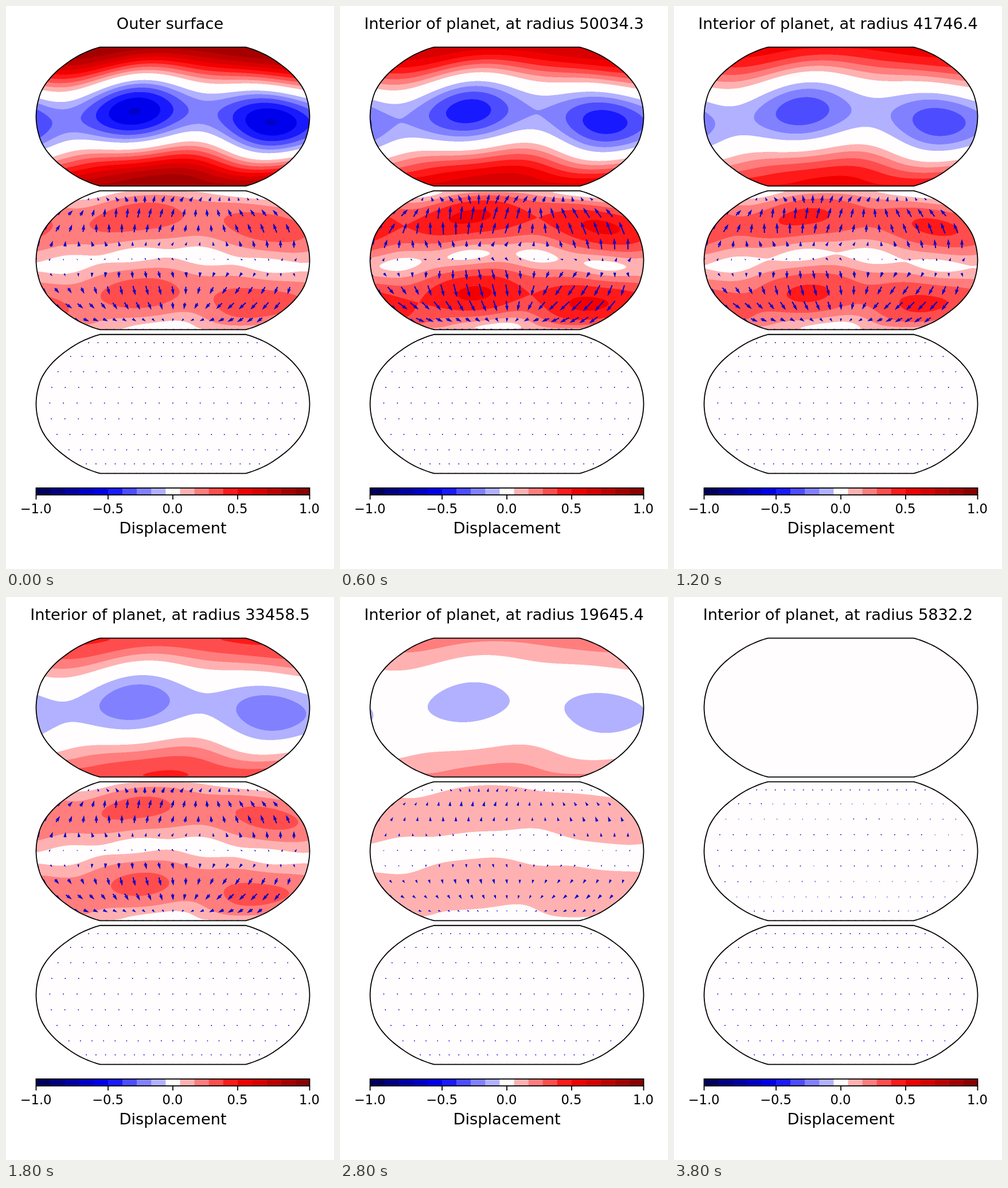
Write an HTML page with a canvas that moves like this. It is 572x980 px and loops after 4 s.

```html
<!DOCTYPE html>
<html lang="en">
<head>
<meta charset="utf-8">
<title>Planet displacement</title>
<style>
  html, body { margin: 0; width: 100%; height: 100%; overflow: hidden; background: #fff; }
  canvas, svg { position: absolute; left: 0; top: 0; display: block; }
  text { font-family: "DejaVu Sans", sans-serif; text-anchor: middle; fill: #000; }
  .large { font-size: 27.22px; }
  .small { font-size: 22.69px; }
  .line { fill: none; stroke: #000; stroke-width: 1.8; }
</style>
</head>
<body>
<canvas id="stage" width="572" height="980"></canvas>
<svg id="overlay" width="572" height="980" viewBox="0 0 572 980"></svg>
<script>
const STEPS = 20, STEP_MS = 200, RADIUS = 58322.21;
const CX = 291, HALF_W = 238.5, HALF_H = 120.97;
const CENTERS = [192.5, 442.5, 692.7];
const RAD = Math.PI / 180;

// Robinson projection, one entry per 5 degrees of latitude
const WIDTHS = [1, .9986, .9954, .99, .9822, .973, .96, .9427, .9216, .8962, .8679,
  .835, .7986, .7597, .7186, .6732, .6213, .5722, .5322];
const HEIGHTS = [0, .062, .124, .186, .248, .31, .372, .434, .4958, .5571, .6176,
  .6769, .7346, .7903, .8435, .8936, .9394, .9761, 1];

function interpolate(table, absLat, parity) {
  const at = i => i < 0 ? parity * table[-i] : i > 18 ? 2 * table[18] - table[17] : table[i];
  const i = Math.min(17, Math.floor(absLat / 5)), f = absLat / 5 - i;
  const [a, b, c, d] = [at(i - 1), at(i), at(i + 1), at(i + 2)];
  return b + f / 2 * (c - a + f * (2 * a - 5 * b + 4 * c - d + f * (3 * (b - c) + d - a)));
}
const rowWidth = lat => interpolate(WIDTHS, Math.abs(lat), 1);
const rowHeight = lat => Math.sign(lat) * interpolate(HEIGHTS, Math.abs(lat), -1);
const project = (lon, lat) => [HALF_W * rowWidth(lat) * lon / 180, -HALF_H * rowHeight(lat)];

function latitudeAt(height) {
  let lo = -90, hi = 90;
  for (let i = 0; i < 24; i++) {
    const mid = (lo + hi) / 2;
    if (rowHeight(mid) < height) lo = mid; else hi = mid;
  }
  return (lo + hi) / 2;
}

// Degree-2 pattern: principal axes and their values
const direction = (lon, lat) => [
  Math.cos(lat * RAD) * Math.cos(lon * RAD),
  Math.cos(lat * RAD) * Math.sin(lon * RAD),
  Math.sin(lat * RAD)];
const dot = (a, b) => a[0] * b[0] + a[1] * b[1] + a[2] * b[2];
const LOW_AXIS = direction(-50.6, 6.3), HIGH_AXIS = direction(167.8, 82);
const LOW = -.697, MIDDLE = -.303, HIGH = 1;

function pattern(lon, lat) {
  const n = direction(lon, lat);
  const east = [-Math.sin(lon * RAD), Math.cos(lon * RAD), 0];
  const north = direction(lon, lat + 90);
  const p = dot(n, LOW_AXIS), q = dot(n, HIGH_AXIS);
  const a = (LOW - MIDDLE) * p, b = (HIGH - MIDDLE) * q;
  const slope = v => 2 * (a * dot(v, LOW_AXIS) + b * dot(v, HIGH_AXIS));
  return { value: MIDDLE + a * p + b * q, east: slope(east), north: slope(north) };
}

function amplitudes(step) {
  if (step === 0) return { radial: .87, tangential: .2135 };
  const x = 1 - .9 * step / (STEPS - 1);
  return { radial: x * (.657 + .161 * x * x), tangential: x * (.3335 + .033 * x * x) };
}

// Colour bands: 0.1 wide, with one neutral band from -0.1 to 0.1
function seismic(value) {
  const p = Math.floor((value + 1) * 128) / 255;
  const up = (from, to, start) => from + (to - from) * (p - start) * 4;
  const rgb = p < .25 ? [0, 0, up(.3, 1, 0)]
    : p < .5 ? [up(0, 1, .25), up(0, 1, .25), 1]
    : p < .75 ? [1, up(1, 0, .5), up(1, 0, .5)]
    : [up(1, .5, .75), 0, 0];
  return rgb.map(c => Math.round(c * 255));
}
const BANDS = Array.from({ length: 19 }, (_, i) => {
  const n = i - 9;
  return seismic(n ? Math.sign(n) * (Math.abs(n) + .5) / 10 : 0);
});
const css = rgb => `rgb(${rgb})`;
const PACKED = new Uint32Array(BANDS.map(([r, g, b]) => (255 << 24 | b << 16 | g << 8 | r) >>> 0));
const bandOf = v => 9 + Math.sign(v) * Math.min(9, Math.floor(Math.abs(v) * 10));

// Sampled fields, twice the stage resolution
const MAP_W = 478, MAP_H = 243, SCALE = 2;
const W = MAP_W * SCALE, H = MAP_H * SCALE;
const radialField = new Float32Array(W * H), tangentField = new Float32Array(W * H);
for (let j = 0; j < H; j++) {
  const y = (j + .5) / SCALE - MAP_H / 2;
  const lat = latitudeAt(-y / HALF_H), perPixel = 180 / (HALF_W * rowWidth(lat));
  for (let i = 0; i < W; i++) {
    const s = pattern(((i + .5) / SCALE - MAP_W / 2) * perPixel, lat);
    radialField[j * W + i] = s.value;
    tangentField[j * W + i] = Math.hypot(s.east, s.north);
  }
}

const outline = (() => {
  const points = [];
  for (let lat = -90; lat <= 90; lat += 2) points.push(project(180, lat));
  for (let lat = 90; lat >= -90; lat -= 2) points.push(project(-180, lat));
  return "M" + points.map(p => p.map(c => c.toFixed(2)).join()).join("L") + "Z";
})();

// Arrow sites with their screen direction and unit magnitude
const sites = [];
for (let j = 0; j < 10; j++) for (let i = 0; i < 20; i++) {
  const lat = Math.max(-89.9, -90 + j * 9 * 180 / 89), lon = -180 + i * 18;
  const { east, north } = pattern(lon, lat);
  const size = Math.hypot(east, north), d = 1e-3 / size;
  const [x, y] = project(lon, lat);
  const [x2, y2] = project(lon + d * east / Math.cos(lat * RAD), lat + d * north);
  sites.push({ x, y, size, angle: Math.atan2(y2 - y, x2 - x) });
}

const SHAFT = 2.02, HEAD = 5, PX_PER_UNIT = 47.7;
function arrow({ x, y, size, angle }, amplitude) {
  const length = size * amplitude * PX_PER_UNIT / SHAFT;
  let points;
  if (length < 1) {
    points = [0, 1, 2, 3, 4, 5].map(k => [.5 * Math.cos(k * Math.PI / 3), .5 * Math.sin(k * Math.PI / 3)]);
  } else {
    const full = Math.max(length, HEAD), shrink = Math.min(1, length / HEAD);
    const half = [[0, .5], [full - 4.5, .5], [full - HEAD, 1.5], [full, 0]];
    const mirrored = half.slice(0, 3).reverse().map(([a, b]) => [a, -b]);
    points = half.concat(mirrored).map(([a, b]) => [(a - full / 2) * shrink, b * shrink]);
  }
  const c = Math.cos(angle) * SHAFT, s = Math.sin(angle) * SHAFT;
  return "M" + points.map(([a, b]) =>
    (x + a * c - b * s).toFixed(2) + "," + (y + a * s + b * c).toFixed(2)).join("L") + "Z";
}
const arrows = amplitude => sites.map(s => arrow(s, amplitude)).join("");

function colorbar() {
  const left = CX - HALF_W, cell = HALF_W * 2 / 19, top = 839, height = 12;
  const cells = BANDS.map((c, i) =>
    `<rect x="${left + i * cell}" y="${top}" width="${cell + (i < 18 ? .5 : 0)}" height="${height}" fill="${css(c)}"/>`);
  const ticks = [[0, "−1.0"], [5, "−0.5"], [9.5, "0.0"], [14, "0.5"], [19, "1.0"]].map(([n, label]) => {
    const x = left + n * cell;
    return `<path class="line" d="M${x} ${top + height}v8"/><text class="small" x="${x - .5}" y="883">${label}</text>`;
  });
  return cells.join("") + ticks.join("") +
    `<rect class="line" x="${left}" y="${top}" width="${HALF_W * 2}" height="${height}"/>` +
    `<text class="large" x="${CX}" y="918">Displacement</text>`;
}

document.getElementById("overlay").innerHTML =
  `<defs><clipPath id="globe"><path d="${outline}"/></clipPath></defs>` +
  `<text id="title" class="large" x="286" y="40"></text>` +
  CENTERS.map((cy, i) => `<g transform="translate(${CX} ${cy})">` +
    (i ? `<g clip-path="url(#globe)"><path id="arrows${i}" fill="#0000cd"/></g>` : "") +
    `<path class="line" d="${outline}"/></g>`).join("") +
  colorbar();

const title = document.getElementById("title");
const tangentArrows = document.getElementById("arrows1");
document.getElementById("arrows2").setAttribute("d", arrows(0));

const ctx = document.getElementById("stage").getContext("2d");
const buffer = document.createElement("canvas");
buffer.width = W;
buffer.height = H;
const bufferCtx = buffer.getContext("2d");
const image = bufferCtx.createImageData(W, H);
const pixels = new Uint32Array(image.data.buffer);
const globe = new Path2D(outline);
ctx.imageSmoothingQuality = "high";

function paintMap(cy, field, amplitude) {
  ctx.save();
  ctx.translate(CX, cy);
  ctx.clip(globe);
  if (field) {
    for (let i = 0; i < pixels.length; i++) pixels[i] = PACKED[bandOf(field[i] * amplitude)];
    bufferCtx.putImageData(image, 0, 0);
    ctx.drawImage(buffer, -MAP_W / 2, -MAP_H / 2, MAP_W, MAP_H);
  } else {
    ctx.fillStyle = css(BANDS[9]);
    ctx.fill(globe);
  }
  ctx.restore();
}

function draw(step) {
  const { radial, tangential } = amplitudes(step);
  const radius = RADIUS * (1 - .9 * step / (STEPS - 1));
  title.textContent = step ? `Interior of planet, at radius ${radius.toFixed(1)}` : "Outer surface";
  ctx.clearRect(0, 0, 572, 980);
  paintMap(CENTERS[0], radialField, radial);
  paintMap(CENTERS[1], tangentField, tangential);
  paintMap(CENTERS[2]);
  tangentArrows.setAttribute("d", arrows(tangential));
}

let shown = -1;
function tick() {
  const step = Math.floor(performance.now() / STEP_MS) % STEPS;
  if (step !== shown) draw(shown = step);
  requestAnimationFrame(tick);
}
tick();
</script>
</body>
</html>
```
